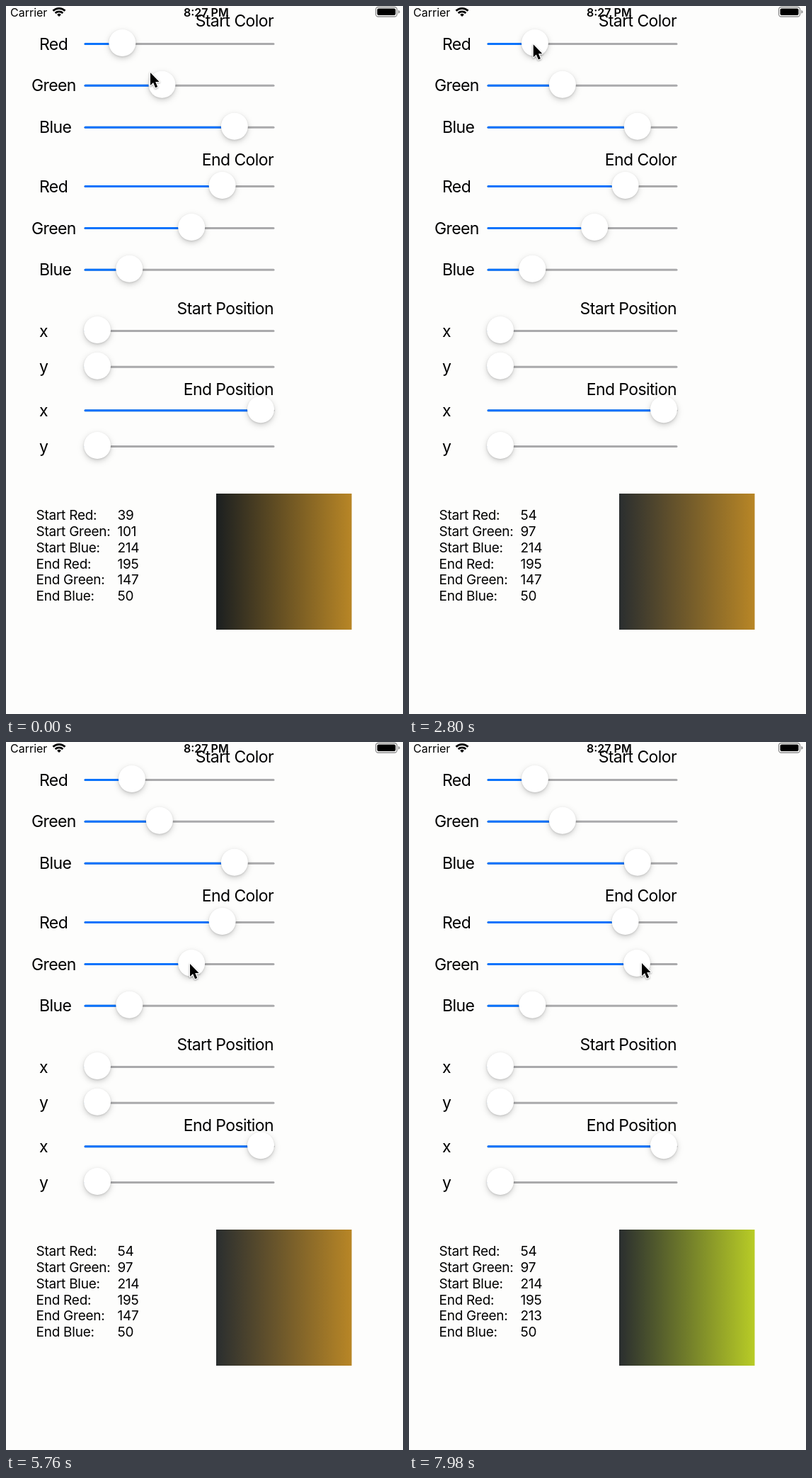
Write an HTML page that moves like this. It is 561 by 999 pixels and loops after 8000 ms.

```html
<!DOCTYPE html>
<html lang="en">
<head>
<meta charset="utf-8">
<title>Gradient sliders</title>
<style>
  html, body { margin: 0; width: 100%; height: 100%; overflow: hidden; background: #fdfdfc; }
  svg { display: block; width: 561px; height: 999px; }
  text { font-family: Inter, Roboto, sans-serif; fill: #000; }
  .label { font-size: 23px; letter-spacing: -.6px; }
  .info { font-size: 19px; letter-spacing: -.25px; }
  .status { font-size: 16px; letter-spacing: 0; }
  .right { text-anchor: end; }
  .track { stroke: #aaaaac; stroke-width: 3; stroke-linecap: round; }
  .fill { stroke: #0a73fc; stroke-width: 3; stroke-linecap: round; }
  .knob { fill: #fff; filter: drop-shadow(0 3px 4px rgba(0, 0, 0, .18)) drop-shadow(0 1px 1px rgba(0, 0, 0, .12)); }
  #cursor { filter: drop-shadow(0 1.5px 1px rgba(0, 0, 0, .35)); }
</style>
</head>
<body>
<svg id="stage" viewBox="0 0 561 999">
  <defs>
    <linearGradient id="blend">
      <stop id="from" offset="0"/>
      <stop id="to" offset="1"/>
    </linearGradient>
  </defs>

  <text class="status" x="6" y="14.5">Carrier</text>
  <g fill="none" stroke="#000" stroke-width="2.7">
    <path d="M66.5 6.7A12.3 12.3 0 0 1 83.5 6.7"/>
    <path d="M69.6 9.9A8 8 0 0 1 80.4 9.9"/>
    <path d="M75 15L72.2 12.2A4 4 0 0 1 77.8 12.2Z" fill="#000" stroke="none"/>
  </g>
  <text class="status" x="251" y="14.5" font-weight="600">8:27 PM</text>
  <rect x="522.5" y="1.5" width="30" height="13.5" rx="3.5" fill="none" stroke="#8c8c8c" stroke-width="1.3"/>
  <rect x="524.5" y="3.5" width="26" height="9.5" rx="2" fill="#000"/>
  <path d="M554.3 5.8Q556.5 6.5 556.5 8.3T554.3 10.8Z" fill="#8c8c8c"/>

  <g id="controls"></g>
  <rect x="297" y="688" width="191.5" height="192" fill="url(#blend)"/>
  <path id="cursor" d="M0 0V18L4.1 14.1L7.1 21.2L10.2 19.9L7.2 12.9H12.6Z"
        fill="#000" stroke="#fff" stroke-width="2.4" stroke-linejoin="round" paint-order="stroke"/>
</svg>

<script>
const LOOP = 8000;
const byId = id => document.getElementById(id);
const controls = byId('controls');

function add(tag, attrs, content = '') {
  const node = document.createElementNS('http://www.w3.org/2000/svg', tag);
  for (const name in attrs) node.setAttribute(name, attrs[name]);
  node.textContent = content;
  return controls.appendChild(node);
}

const knobX = value => 129 + value / 255 * 231;

function slider(name, labelX, y, value) {
  add('text', { class: 'label', x: labelX, y: y + 8 }, name);
  add('line', { class: 'track', x1: 112, x2: 378, y1: y, y2: y });
  const fill = add('line', { class: 'fill', x1: 112, y1: y, y2: y });
  const knob = add('circle', { class: 'knob', cy: y - 1.5, r: 19 });
  const set = v => {
    fill.setAttribute('x2', knobX(v));
    knob.setAttribute('cx', knobX(v));
  };
  set(value);
  return set;
}

const heading = (name, y) => add('text', { class: 'label right', x: 378, y }, name);

heading('Start Color', 28.5);
const setRed = slider('Red', 47, 53.5, 39);
const setGreen = slider('Green', 36, 112.3, 101);
slider('Blue', 47, 171.2, 214);
heading('End Color', 224.5);
slider('Red', 47, 254.5, 195);
const setEndGreen = slider('Green', 36, 313.5, 147);
slider('Blue', 47, 372.3, 50);
heading('Start Position', 435);
slider('x', 47, 458.5, 0);
slider('y', 47, 509.3, 0);
heading('End Position', 548.5);
slider('x', 47, 570.8, 255);
slider('y', 47, 621.5, 0);

const readouts = [
  ['Start Red:', 39], ['Start Green:', 101], ['Start Blue:', 214],
  ['End Red:', 195], ['End Green:', 147], ['End Blue:', 50]
].map(([name, value], i) => {
  const y = 724.8 + i * 22.9;
  add('text', { class: 'info', x: 42.5, y }, name);
  return add('text', { class: 'info', x: 157.5, y }, value);
});

// Smooth curve through [time, value] points that never overshoots them.
function curve(points) {
  const rate = i => (points[i + 1][1] - points[i][1]) / (points[i + 1][0] - points[i][0]);
  const slope = points.map((_, i) => {
    if (!i || i === points.length - 1) return rate(i ? i - 1 : 0);
    const a = rate(i - 1), b = rate(i);
    return a * b > 0 ? 2 * a * b / (a + b) : 0;
  });
  return t => {
    if (t >= points.at(-1)[0]) return points.at(-1)[1];
    const i = points.findIndex(p => p[0] > t) - 1;
    const [t0, v0] = points[i], [t1, v1] = points[i + 1];
    const d = t1 - t0, u = (t - t0) / d, w = 1 - u;
    return w * w * (1 + 2 * u) * v0 + u * u * (3 - 2 * u) * v1
      + u * w * d * (w * slope[i] - u * slope[i + 1]);
  };
}

const red = curve([[0, 39], [980, 39], [1520, 148], [1950, 206], [2260, 180], [2800, 54], [3000, 54]]);
const green = curve([[0, 101], [120, 97], [200, 97]]);
const endGreen = curve([[0, 147], [6080, 147], [6580, 104], [6980, 58], [7980, 213]]);

const path = [
  [0, 204, 94], [200, 199, 95], [780, 166, 51], [900, 166, 51], [1520, 287, 57],
  [1860, 314, 53], [2260, 241, 48], [2680, 175, 52], [2950, 178, 60], [3760, 219, 331],
  [4300, 222, 395], [4880, 211, 420], [5650, 260, 313], [5950, 260, 313],
  [6580, 175, 306], [6840, 142, 310], [7980, 329, 312]
];
const cursorX = curve(path.map(([t, x]) => [t, x]));
const cursorY = curve(path.map(([t, , y]) => [t, y]));

function draw(t) {
  const r = red(t), g = green(t), eg = endGreen(t);
  setRed(r);
  setGreen(g);
  setEndGreen(eg);
  readouts[0].textContent = Math.round(r);
  readouts[1].textContent = Math.round(g);
  readouts[4].textContent = Math.round(eg);
  byId('from').setAttribute('stop-color', `rgb(${r - 12}, ${r - 8}, ${r - 7})`);
  byId('to').setAttribute('stop-color', `rgb(184, ${eg * 1.05 - 20}, 38)`);
  byId('cursor').setAttribute('transform', `translate(${cursorX(t)} ${cursorY(t)})`);
}

const start = performance.now();
function tick() {
  draw((performance.now() - start) % LOOP);
  requestAnimationFrame(tick);
}
tick();
</script>
</body>
</html>
```
